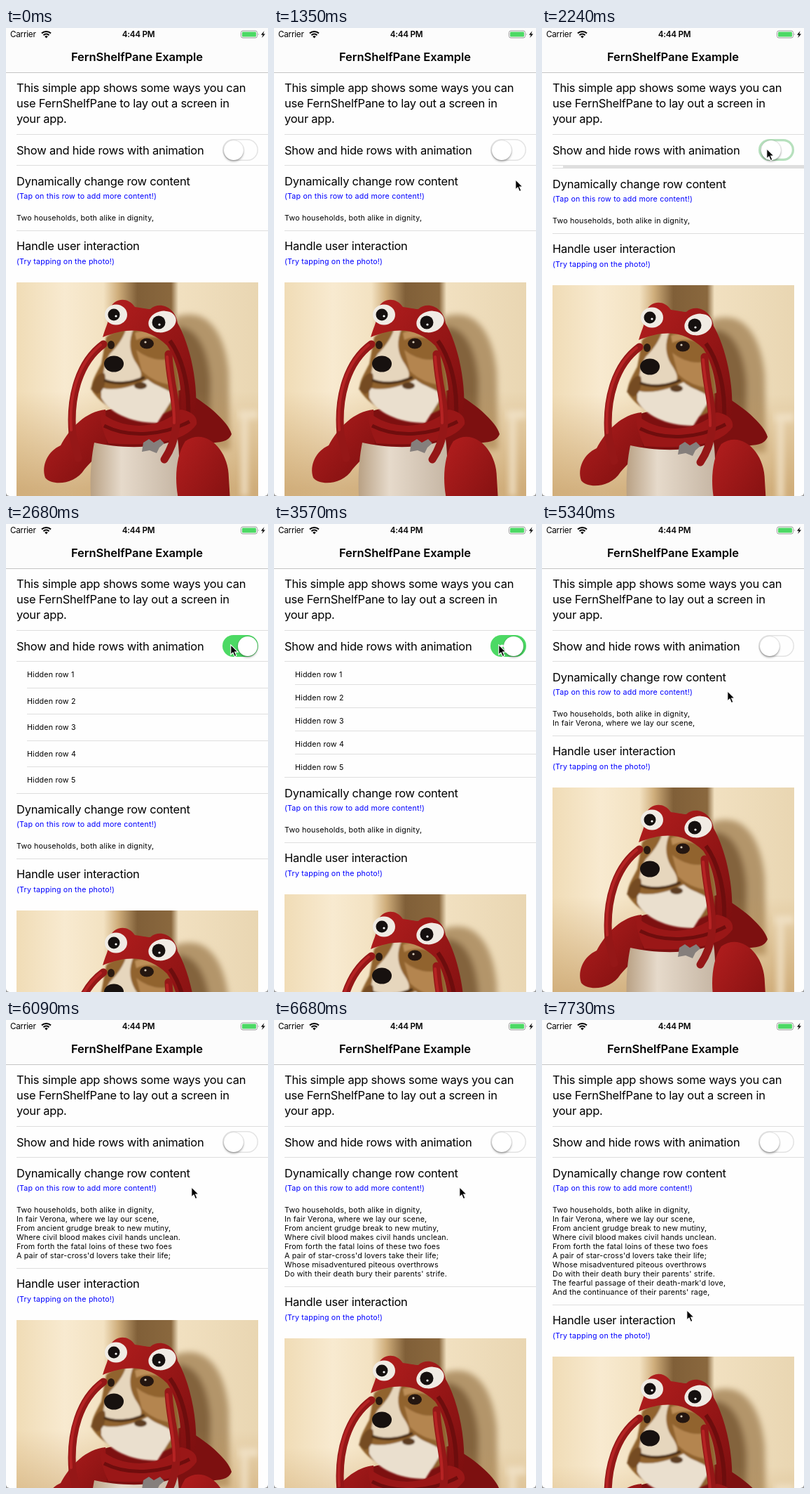
These frames come from a looping animation (374 by 666 pixels, 8000 ms). An HTML page:

```html
<!DOCTYPE html>
<html lang="en">
<head>
<meta charset="utf-8">
<title>Stack of rows</title>
<style>
  /* --open: hidden rows, --on: switch, --lines: visible verse lines */
  @property --open { syntax: "<number>"; inherits: true; initial-value: 0; }
  @property --on { syntax: "<number>"; inherits: true; initial-value: 0; }
  @property --lines { syntax: "<number>"; inherits: true; initial-value: 1; }

  html, body { margin: 0; width: 100%; height: 100%; overflow: hidden; background: #999; }

  .stage {
    position: relative; width: 374px; height: 666px; overflow: hidden;
    border-radius: 0 0 5px 5px; background: #fefefe; color: #000;
    font: 16.5px/22px Inter, Roboto, sans-serif; letter-spacing: -.24px;
    white-space: nowrap;
    animation: toggle 8s step-end infinite, verse 8s step-end infinite;
  }

  .bar { position: absolute; inset: 0 0 auto; height: 63px; background: #fcfcfc; border-bottom: 1px solid #c4c4c4; }
  .bar span { position: absolute; top: 2px; font-size: 11.7px; line-height: 15px; }
  .bar .clock { left: 0; right: 0; padding-left: 4px; text-align: center; font-weight: 600; }
  .bar svg { position: absolute; left: 0; top: 0; }
  h1 { margin: 0; position: absolute; top: 30px; width: 100%; text-align: center; font-size: 16.5px; font-weight: 600; letter-spacing: -.05px; }

  .rows { position: absolute; top: 64px; left: 0; width: 374px; }
  .row { position: relative; box-sizing: border-box; padding: 11px 0 0 15px; }
  .row::after { content: ""; position: absolute; left: 15px; right: 0; bottom: 0; height: 1px; background: #dedede; }
  .row.intro { height: 88px; padding-top: 10px; }
  .row.switch { height: 44px; }
  .row.last { padding-top: 10px; }
  .row.last .hint { margin-top: 5px; }
  .row.last::after { display: none; }

  small { display: block; font-size: 10.7px; line-height: 13px; letter-spacing: .18px; }
  .hint { margin-top: 4px; color: #00f; }
  .verse { margin: 18px 0 0; padding-bottom: 12px; }
  .verse small { height: calc(13px * var(--lines)); overflow: hidden; }

  .hidden { height: calc(37.5px * var(--open)); padding: 0 0 0 30px; overflow: hidden; }
  .hidden small { position: absolute; top: 12px; }
  .hidden::after { left: 30px; }
  .hidden:nth-child(7)::after { left: 15px; }

  .track {
    --tint: color-mix(in srgb, #4cd964 calc(min(1, 2.5 * var(--on)) * 100%), #e3e3e3);
    position: absolute; left: 309px; top: 6px; width: 51px; height: 31px; border-radius: 16px;
    background: #fefefe; box-shadow: inset 0 0 0 calc(1.5px + 14.5px * var(--on)) var(--tint);
  }
  .knob {
    position: absolute; left: calc(1.5px + 20px * var(--on)); top: 1.5px; width: 28px; height: 28px;
    border-radius: 50%; background: #fff;
    box-shadow: 0 0 1.5px rgba(0, 0, 0, .3), 0 2px 3px rgba(0, 0, 0, .3);
  }

  .photo { position: absolute; left: 15px; top: 73px; }
  .cursor { position: absolute; left: 0; top: 0; opacity: 0; animation: point 8s step-end infinite; }

  @keyframes toggle {
    0%      { --open: 0; --on: 0; }
    28%     { --open: .0215; --on: .12; }
    29.875% { --open: .6; --on: .7; }
    31.75%  { --open: .98; --on: 1; }
    33.5%   { --open: 1; --on: 1; }
    44.625% { --open: .88; --on: .85; }
    46.5%   { --open: .2; --on: .2; }
    48.375%, 100% { --open: 0; --on: 0; }
  }
  @keyframes verse {
    0%      { --lines: 1; }
    66.75%  { --lines: 2; }
    68.625% { --lines: 3; }
    72.375% { --lines: 4; }
    74.25%  { --lines: 5; }
    76.125% { --lines: 6; }
    79.875% { --lines: 7; }
    83.5%   { --lines: 8; }
    85.375% { --lines: 9; }
    89.125%, 100% { --lines: 10; }
  }
  @keyframes point {
    0%      { opacity: 0; translate: 344px 215px; }
    16.875% { opacity: 1; translate: 344px 215px; }
    18.75%  { opacity: 1; translate: 330px 192px; }
    20.625% { opacity: 1; translate: 312px 176px; }
    22.5%   { opacity: 1; translate: 320px 171px; }
    53.875% { opacity: 1; translate: 316px 180px; }
    55.75%  { opacity: 1; translate: 298px 205px; }
    57.625% { opacity: 1; translate: 273px 231px; }
    59.375% { opacity: 1; translate: 264px 237px; }
    91%     { opacity: 1; translate: 260px 255px; }
    92.875% { opacity: 1; translate: 242px 315px; }
    94.75%  { opacity: 1; translate: 216px 385px; }
    96.625%, 100% { opacity: 1; translate: 206px 412px; }
  }
</style>
</head>
<body>
<div class="stage">
  <div class="bar">
    <span style="left:6px">Carrier</span>
    <span class="clock">4:44 PM</span>
    <svg width="374" height="20">
      <g fill="none" stroke="#000" stroke-width="2.1">
        <path d="M51 7.6a9.6 9.6 0 0 1 13 0M53.5 10.2a6 6 0 0 1 8 0"/>
      </g>
      <path d="M57.5 14.6l-2.3-2.5a3.3 3.3 0 0 1 4.6 0z"/>
      <rect x="335.5" y="4" width="23" height="10" rx="2.5" fill="#fff" stroke="#999"/>
      <rect x="337" y="5.5" width="20" height="7" rx="1.2" fill="#4cd964"/>
      <path d="M360 7.3q1.8 1.7 0 3.4z" fill="#999"/>
      <path d="M368.6 4.2l-4.6 5.5h2.8l-1.6 4.3 4.8-5.6h-2.9z"/>
    </svg>
    <h1>FernShelfPane Example</h1>
  </div>

  <div class="rows">
    <div class="row intro">This simple app shows some ways you can<br>use FernShelfPane to lay out a screen in<br>your app.</div>
    <div class="row switch">Show and hide rows with animation<div class="track"><div class="knob"></div></div></div>
    <div class="row hidden"><small>Hidden row 1</small></div>
    <div class="row hidden"><small>Hidden row 2</small></div>
    <div class="row hidden"><small>Hidden row 3</small></div>
    <div class="row hidden"><small>Hidden row 4</small></div>
    <div class="row hidden"><small>Hidden row 5</small></div>
    <div class="row">Dynamically change row content
      <small class="hint">(Tap on this row to add more content!)</small>
      <div class="verse"><small>Two households, both alike in dignity,<br>In fair Verona, where we lay our scene,<br>From ancient grudge break to new mutiny,<br>Where civil blood makes civil hands unclean.<br>From forth the fatal loins of these two foes<br>A pair of star-cross'd lovers take their life;<br>Whose misadventured piteous overthrows<br>Do with their death bury their parents' strife.<br>The fearful passage of their death-mark'd love,<br>And the continuance of their parents' rage,</small></div>
    </div>
    <div class="row last">Handle user interaction
      <small class="hint">(Try tapping on the photo!)</small>
      <svg class="photo" width="345" height="345" viewBox="15 362 345 345">
        <defs>
          <linearGradient id="wall">
            <stop offset="0" stop-color="#f0dcb6"/>
            <stop offset=".2" stop-color="#f8ead0"/>
            <stop offset=".36" stop-color="#f3e2c2"/>
            <stop offset=".42" stop-color="#cfae7c"/>
            <stop offset=".5" stop-color="#805f38"/>
            <stop offset=".64" stop-color="#8a683e"/>
            <stop offset=".67" stop-color="#f1e0c0"/>
            <stop offset="1" stop-color="#e9d6b2"/>
          </linearGradient>
          <linearGradient id="floor" x2="0" y2="1">
            <stop offset=".45" stop-color="#c69a5c" stop-opacity="0"/>
            <stop offset=".85" stop-color="#c49b62" stop-opacity=".7"/>
          </linearGradient>
          <linearGradient id="felt" x1="0" y1="0" x2="1" y2="1">
            <stop offset="0" stop-color="#b31e1e"/>
            <stop offset="1" stop-color="#7c0f0f"/>
          </linearGradient>
          <linearGradient id="belly">
            <stop offset="0" stop-color="#b9a184"/>
            <stop offset=".35" stop-color="#e6dacb"/>
            <stop offset="1" stop-color="#c6b6a4"/>
          </linearGradient>
          <filter id="soft"><feGaussianBlur stdDeviation="4"/></filter>
          <filter id="fur"><feGaussianBlur stdDeviation="1.2"/></filter>
        </defs>

        <rect x="15" y="362" width="345" height="345" fill="url(#wall)"/>
        <g filter="url(#soft)">
          <path d="M240 412C285 395 312 430 318 490L320 600H235z" fill="#b3956a"/>
          <path d="M245 425C272 425 288 455 292 500V560H245z" fill="#83633c"/>
        </g>
        <rect x="15" y="362" width="345" height="345" fill="url(#floor)"/>
        <path d="M332 544h28v12h-15v110h-9V556h-4z" fill="#efdfc2" filter="url(#soft)"/>

        <!-- body and sleeves -->
        <path d="M250 515C280 528 318 560 322 578C316 592 300 588 290 592L240 640 130 600 140 545z" fill="#7d1010"/>
        <path d="M142 543C114 546 92 568 78 594C60 602 50 622 56 640C66 652 98 650 112 628C124 614 134 606 144 596z" fill="url(#felt)"/>
        <path d="M126 590C160 598 215 600 245 585C250 620 246 670 240 707H125C118 660 120 620 126 590z" fill="url(#belly)"/>
        <path d="M256 588C285 568 318 600 318 640L322 707H262C240 680 236 618 256 588z" fill="url(#felt)"/>

        <!-- head -->
        <g filter="url(#fur)">
          <path d="M143 440C160 424 205 420 228 440C246 470 250 510 244 540L205 558C170 556 140 540 124 518C118 508 130 490 136 478z" fill="#91632f"/>
          <path d="M136 512C160 518 186 508 202 500C216 512 232 512 240 524L216 562C176 562 146 546 136 526z" fill="#eadfce"/>
          <path d="M172 427L182 428C175 445 176 460 184 474C192 486 196 494 190 500C172 508 150 506 139 500C138 488 142 474 148 464C160 452 168 440 172 427z" fill="#e6d6bd"/>
          <path d="M121 514C126 498 134 488 141 492C144 506 138 518 130 521z" fill="#754c23"/>
          <path d="M186 458C198 468 218 476 234 470L242 508C224 508 206 500 194 488z" fill="#b48550"/>
          <path d="M184 434C196 428 212 432 220 442C206 438 194 440 186 444z" fill="#bd8f58"/>
          <path d="M140 501C156 508 178 506 198 497" fill="none" stroke="#4b2e18" stroke-width="4"/>
          <ellipse cx="192" cy="509" rx="9" ry="5" fill="#5d3d22"/>
        </g>
        <ellipse cx="154" cy="478" rx="14" ry="11.5" fill="#17110f"/>
        <ellipse cx="150" cy="451" rx="5" ry="6" fill="#2a1a10"/>
        <ellipse cx="201" cy="449" rx="10" ry="7.5" fill="#241610"/>
        <circle cx="199" cy="447" r="1.6" fill="#d8cbb8"/>

        <!-- hood -->
        <path d="M138 440C142 425 148 418 147 402C152 386 172 380 184 397C194 398 200 400 206 400C220 388 242 398 245 420C262 450 274 500 271 548L250 556C252 515 246 476 230 452C206 428 176 424 138 440z" fill="url(#felt)"/>
        <path d="M234 445C252 470 262 510 260 552" fill="none" stroke="#6d0d0d" stroke-width="6"/>
        <path d="M134 546C165 572 215 574 249 543C264 545 274 552 272 564C258 586 215 596 146 591C140 578 134 562 134 546z" fill="#9a1717"/>
        <path d="M140 566C175 584 225 580 262 560" fill="none" stroke="#6f0d0d" stroke-width="5"/>
        <path d="M196 590l8-5 7 5 9-5 6 6-7 6-4 8-10-4-11 2z" fill="#857f7c"/>

        <!-- feelers -->
        <g fill="none" stroke-linecap="round">
          <path d="M139 450C106 474 90 522 95 578L103 612" stroke="#951717" stroke-width="11"/>
          <path d="M135 451C104 476 89 520 93 572" stroke="#b52323" stroke-width="4"/>
          <path d="M232 464C233 500 244 530 243 562C241 588 234 602 226 614" stroke="#951717" stroke-width="11"/>
          <path d="M230 468C232 500 241 530 240 562" stroke="#b52323" stroke-width="4"/>
        </g>

        <!-- hood eyes -->
        <ellipse cx="157" cy="408" rx="16" ry="14.5" fill="#f0ebe4"/>
        <circle cx="154" cy="408" r="8.5" fill="#15100f"/>
        <ellipse cx="223" cy="418" rx="20" ry="15" fill="#f0ebe4" transform="rotate(-15 223 418)"/>
        <circle cx="218" cy="419" r="9.5" fill="#15100f"/>
        <g fill="#fff"><circle cx="157" cy="410" r="1.6"/><circle cx="219" cy="422" r="1.6"/></g>
      </svg>
    </div>
  </div>

  <svg class="cursor" width="13" height="19">
    <path d="M.8.9V15l3.2-3 2.4 5.6 2.6-1.1-2.4-5.4h4.5z" stroke="#fff" stroke-width="1.1"/>
  </svg>
</div>
</body>
</html>
```
